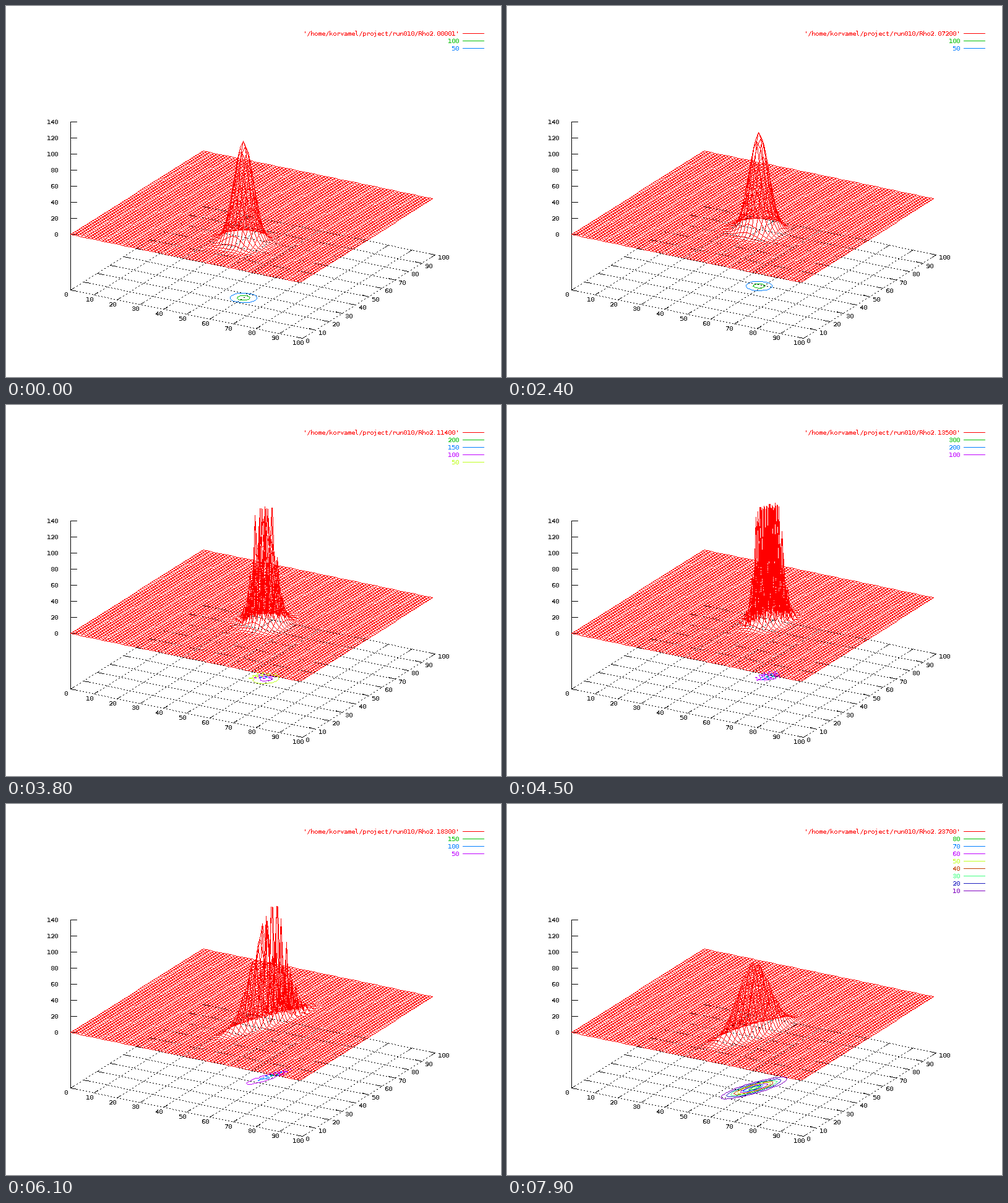
Recreate the animation shown at these times as a matplotlib script. Size 800 px wide and 600 px high, loop 8 s.

```python
import matplotlib.pyplot as plt
import numpy as np
from matplotlib.animation import FuncAnimation
from matplotlib.colors import to_rgb
from matplotlib.transforms import IdentityTransform

W, H, DPI = 800, 600, 100
FRAMES, INTERVAL = 80, 100
CHAR = 6                           # width of one character cell

ORIGIN = np.array([104, 369])      # screen position of (0, 0, 0)
X_DIR = np.array([3.75, 0.78])
Y_DIR = np.array([2.14, -1.35])
Z_DIR = np.array([0, -1.3])
FLOOR, TOP = -69.3, 140

PALETTE = ["#ff0000", "#00c000", "#0080ff", "#c000ff", "#c0ff20",
           "#c04000", "#40ff80", "#2020c0", "#8000c0", "#008040"]
DATA_NAME = "'/home/korvamel/project/run010/Rho2.{:05d}'"

plt.rcParams.update({
    "font.family": "DejaVu Sans Mono", "font.size": 10 * 72 / DPI,
    "text.antialiased": False, "text.hinting": "native",
    "text.hinting_factor": 1,
})


def project(x, y, z):
    x, y, z = (np.asarray(v, float)[..., None] for v in (x, y, z))
    return ORIGIN + x * X_DIR + y * Y_DIR + z * Z_DIR


GX, GY = np.meshgrid(np.linspace(0, 99, 67), np.linspace(0, 100, 68))
CHECKER = 1 - 2 * (np.indices(GX.shape).sum(axis=0) % 2)
WALL = GY - 42.6 - 1.2 * (GX - 50.6)     # distance to the slanted wall
BASE = project(GX, GY, np.full(GX.shape, FLOOR))


def sigmoid(v):
    return 1 / (1 + np.exp(-v))


def density(t):
    """Wave packet that runs along y, hits the wall, breaks up and returns."""
    hit = np.exp(-((t - 5) / 0.95) ** 2)
    spread = np.clip((t - 3.2) / 2.9, 0, 1) ** 3
    there, back = 25.5 + 5.6 * t, 34.3 + 7.2 * (7.9 - t)
    cx = 57.2 + 0.58 * abs(t - 4.8)
    cy = -8 * np.logaddexp(-there / 8, -back / 8)

    height = 85 + 41 / (1 + (t / 4.16) ** 4) + 92 * hit
    vx = 13.7 - 3.7 * spread - 8 * hit
    vy = 13.7 + 42 * spread
    cov = 17 * spread
    dx, dy = GX - cx, GY - cy
    q = (vy * dx**2 - 2 * cov * dx * dy + vx * dy**2) / (vx * vy - cov**2)

    ripple = 1.05 * sigmoid((t - 3) / 0.1) * sigmoid((6.2 - t) / 0.05)
    noise = ripple * sigmoid((WALL + 2 + 8.5 * hit) / 0.8)
    return np.maximum(height * np.exp(-q / 2) * (1 + noise * CHECKER), 0)


def contour_levels(peak):
    power = 10 ** np.floor(np.log10(peak))
    guide = 12 * power / peak
    step = power * (0.2 if guide > 10 else 0.5 if guide > 4 else 1)
    return step * np.arange(1, int(peak / step) + 1)


def stroke(img, a, b, color="#000000", dotted=False):
    """Draw one-pixel lines without smoothing from points a to points b."""
    a, b = (np.floor(np.atleast_2d(p) + 0.5).astype(int) for p in (a, b))
    steps = np.abs(b - a).max(axis=1)
    count = steps + 1
    seg = np.repeat(np.arange(len(a)), count)
    k = np.arange(count.sum()) - (np.cumsum(count) - count)[seg]
    part = (k / np.maximum(steps, 1)[seg])[:, None]
    p = np.floor(a[seg] + part * (b - a)[seg] + 0.5).astype(int)
    if dotted:
        p = p[k % 5 < 2]
    img[p[:, 1], p[:, 0]] = np.round(255 * np.array(to_rgb(color)))


def cut(p, zp, q, zq):
    """Move p towards q down to the top of the z range."""
    f = np.clip((zp - TOP) / np.where(zp > TOP, zp - zq, 1), 0, 1)
    return p + f[:, None] * (q - p)


def stroke_mesh(img, z):
    pts = np.rint(project(GX, GY, z))
    for p, h in ((pts, z), (pts.swapaxes(0, 1), z.T)):
        a, b = p[:, :-1].reshape(-1, 2), p[:, 1:].reshape(-1, 2)
        za, zb = h[:, :-1].ravel(), h[:, 1:].ravel()
        seen = np.minimum(za, zb) <= TOP
        a, b, za, zb = a[seen], b[seen], za[seen], zb[seen]
        stroke(img, cut(a, za, b, zb), cut(b, zb, a, za), PALETTE[0])


fig = plt.figure(figsize=(W / DPI, H / DPI), dpi=DPI, facecolor="white")
tracer = fig.add_axes([0, 0, 1, 1], visible=False)   # only traces contours


def stroke_contours(img, z, levels):
    found = tracer.contour(BASE[..., 0], BASE[..., 1], z, levels=levels)
    for rank, paths in enumerate(found.allsegs):
        for path in paths:
            if len(path) > 1:
                stroke(img, path[:-1], path[1:], PALETTE[len(levels) - rank])
    found.remove()


def label(x, y, text="", color="black"):
    return fig.text(x, H - y, text, color=color, ha="left", va="baseline",
                    transform=IdentityTransform())


def floor_line(img, x0, y0, x1, y1, dotted=False):
    stroke(img, project(x0, y0, FLOOR), project(x1, y1, FLOOR), dotted=dotted)


def draw_axes():
    img = np.full((H, W, 3), 255, np.uint8)
    tick = 2.8
    for v in range(0, 101, 10):
        text = str(v)
        floor_line(img, v, 0, v, 100, dotted=True)
        floor_line(img, 0, v, 100, v, dotted=True)
        for start, end in ((0, tick), (100, 100 - tick)):
            floor_line(img, v, start, v, end)
            floor_line(img, start, v, end, v)
        x, y = project(v, 0, FLOOR)
        label(x - 7 - CHAR * len(text) / 2, y + 11, text)
        x, y = project(100, v, FLOOR)
        label(x + 5, y + 8, text)
    stroke(img, (104, 187), (104, 459))
    for v in range(0, 141, 20):
        text = str(v)
        y = 369 - 1.3 * v
        stroke(img, (104, y), (114, y))
        label(84 - CHAR * len(text), y + 4, text)
    return img


backdrop = draw_axes()
stage = fig.figimage(backdrop, origin="upper")
legend = [label(0, 48 + 12 * row, color=tint)
          for row, tint in enumerate(PALETTE)]


def update(frame):
    z = density(frame * INTERVAL / 1000)
    levels = contour_levels(z.max())
    img = backdrop.copy()
    stroke_mesh(img, z)
    stroke_contours(img, z, levels)

    names = [DATA_NAME.format(max(1, frame * 300))]
    names += [f"{v:.0f}" for v in levels[::-1]]
    for row, text in enumerate(legend):
        name = names[row] if row < len(names) else ""
        text.set_text(name)
        text.set_x(732 - CHAR * len(name))
        if name:
            y = 44 + 12 * row
            stroke(img, (738, y), (772, y), PALETTE[row])
    stage.set_data(img)
    return []


anim = FuncAnimation(fig, update, frames=FRAMES, interval=INTERVAL,
                     init_func=lambda: [], repeat=True, repeat_delay=0,
                     blit=False)
plt.show()
```
